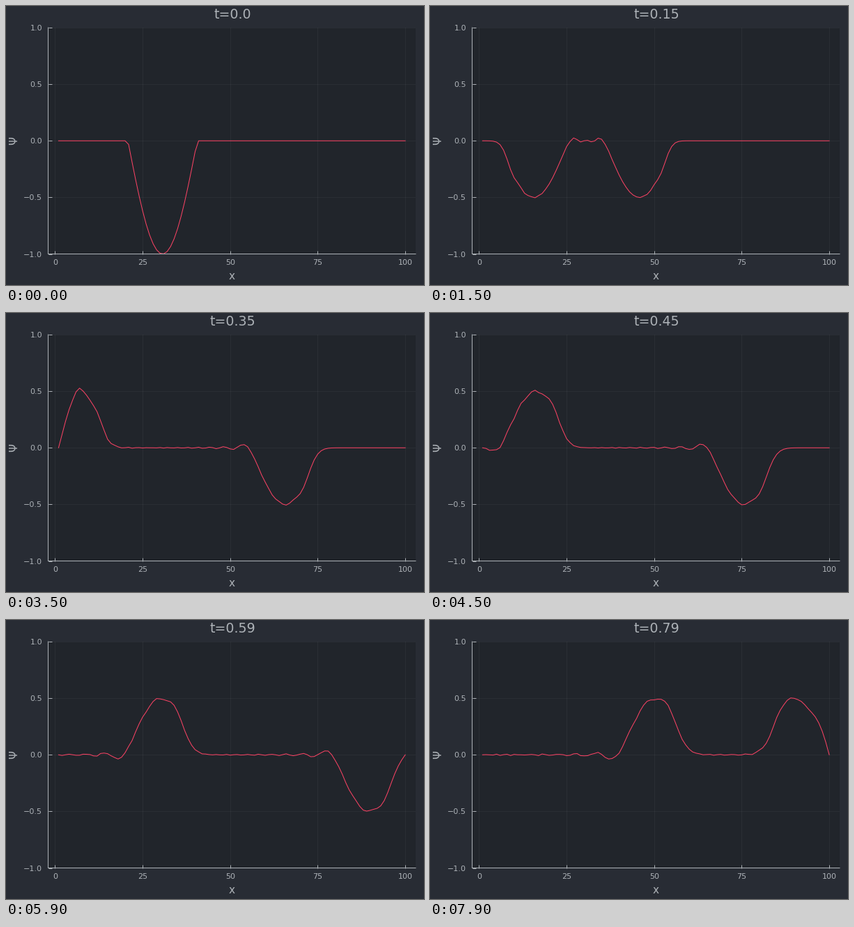
A matplotlib script for the animation above (8 s loop, 600 px wide and 400 px high).

```python
import numpy as np
import matplotlib.pyplot as plt
from matplotlib.animation import FuncAnimation

W, H, DPI = 600, 400, 100
BACK, PANEL, FORE, LINE = "#282C34", "#21252B", "#ADB2B7", "#FE4365"
LEFT, RIGHT, TOP, BOTTOM = 60.5, 588, 31, 355.5
FRAMES, SUBSTEPS = 80, 4
N, DX, DT = 100, 0.01, 0.0025

plt.rcParams["font.family"] = "DejaVu Sans"


def solve():
    """Leapfrog solution of the wave equation with fixed ends."""
    x = np.linspace(0, 1, N)
    psi = np.where((x >= 0.2) & (x <= 0.4), np.sin(5 * np.pi * x), 0.0)
    prev = psi
    c2 = (DT / DX) ** 2
    states = [psi]
    for _ in range(FRAMES - 1):
        for _ in range(SUBSTEPS):
            new = np.zeros(N)
            new[1:-1] = (2 * psi - prev)[1:-1] + c2 * np.diff(psi, 2)
            psi, prev = new, psi
        states.append(psi)
    return states


fig = plt.figure(figsize=(W / DPI, H / DPI), dpi=DPI, facecolor=BACK)
ax = fig.add_axes([LEFT / W, 1 - BOTTOM / H, (RIGHT - LEFT) / W, (BOTTOM - TOP) / H],
                  facecolor=PANEL)
pad = 0.03 * (N - 1)
ax.set(xlim=(1 - pad, N + pad), ylim=(-1, 1),
       xticks=range(0, 101, 25), yticks=np.arange(-1, 1.1, 0.5))
ax.set_axisbelow(True)
ax.grid(color=FORE, alpha=0.1, lw=0.5)
ax.tick_params(direction="in", length=3.8, width=0.72, color=FORE,
               labelbottom=False, labelleft=False)
for side, spine in ax.spines.items():
    spine.set(visible=side in ("left", "bottom"), color=FORE,
              linewidth=0.72, snap=False)


def label(x, y, text, size, **kw):
    kw = {"ha": "center", "va": "baseline", **kw}
    return fig.text(x / W, 1 - y / H, text, size=size, color=FORE, **kw)


for v in range(0, 101, 25):
    px = LEFT + (v - 1 + pad) / (N - 1 + 2 * pad) * (RIGHT - LEFT)
    label(px, 371, str(v), 8)
for v in np.arange(-1, 1.1, 0.5):
    py = BOTTOM + (v + 1) / 2 * (TOP - BOTTOM)
    label(52.2, py + 4, f"{v:.1f}".replace("-", "\u2212"), 8, ha="right")
label(324.5, 392, "x", 11)
label(11.7, 193.2, "\u03a8", 11, rotation=90, va="center")
title = label(325, 18, "", 13.7)

states = solve()
wave, = ax.plot(np.arange(1, N + 1), states[0], color=LINE, lw=0.72)


def update(i):
    wave.set_ydata(states[i])
    title.set_text(f"t={i / 100}")
    return wave, title


anim = FuncAnimation(fig, update, frames=FRAMES, interval=100,
                     repeat=True, repeat_delay=0)
plt.show()
```
